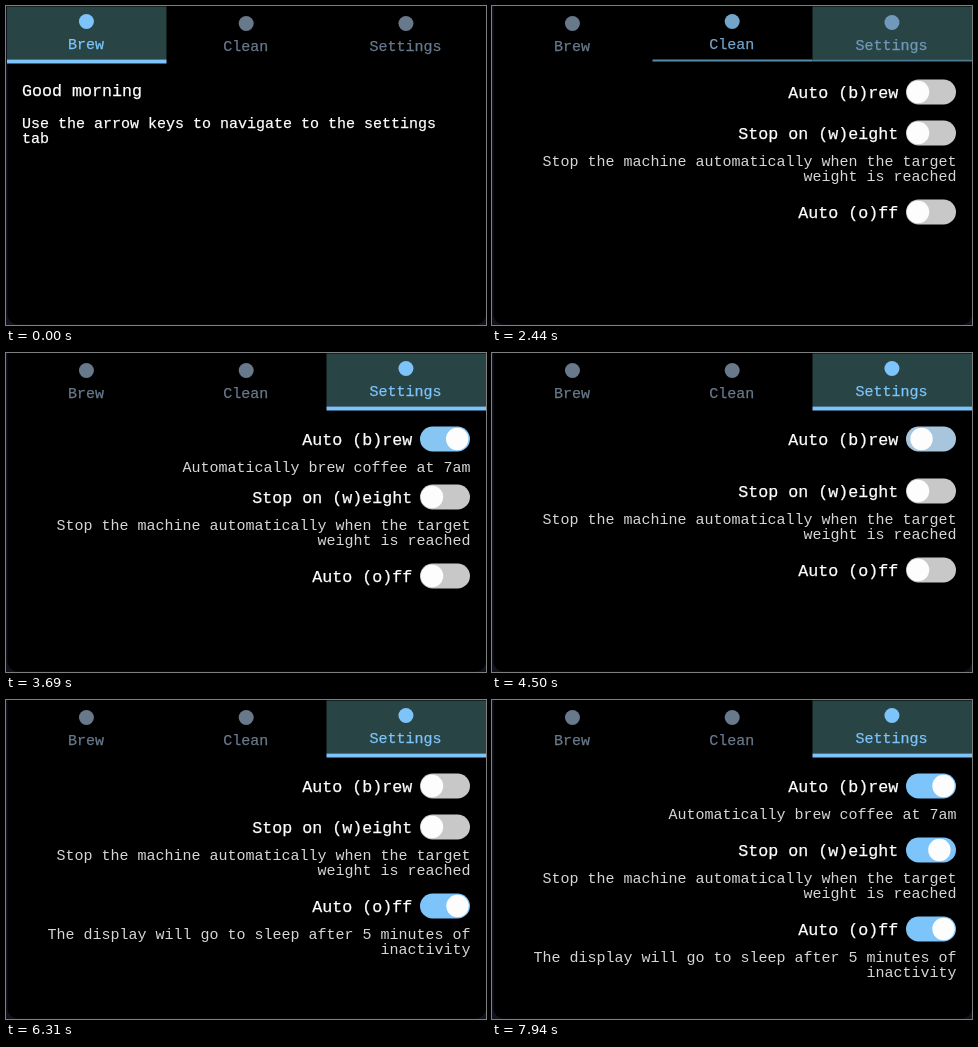
An HTML page with a canvas that plays this animation: 480x319 px, repeating every 8 s.

```html
<!DOCTYPE html>
<html lang="en">
<head>
<meta charset="utf-8">
<title>Coffee machine display</title>
<style>
  html, body { margin: 0; width: 100%; height: 100%; overflow: hidden; background: #10131d; }
  canvas { display: block; }
</style>
</head>
<body>
<canvas id="stage" width="480" height="319"></canvas>
<script>
const ctx = document.getElementById("stage").getContext("2d");
const LOOP = 8000;
const BLUE = [124, 196, 250], SLATE = [104, 121, 139], TEAL = [41, 68, 69], GREY = [200, 200, 200];
const SMALL = 15, LARGE = 16.67;

const tabs = [
  { name: "Brew", left: 1, right: 160.5, opens: -1000 },
  { name: "Clean", left: 160.5, right: 320.5, opens: 1190 },
  { name: "Settings", left: 320.5, right: 480, opens: 2402 }
];

const brew = {
  label: "Auto (b)rew", presses: [3563, 4416, 7200], tintMs: 150, noteHeight: 23,
  note: ["Automatically brew coffee at 7am"]
};
const weight = {
  label: "Stop on (w)eight", presses: [7860], tintMs: 80, alwaysOpen: true, noteHeight: 38,
  note: ["Stop the machine automatically when the target", "weight is reached"]
};
const off = {
  label: "Auto (o)ff", presses: [5750], tintMs: 150, noteHeight: 38,
  note: ["The display will go to sleep after 5 minutes of", "inactivity"]
};

const clamp = v => Math.min(1, Math.max(0, v));
const mix = (a, b, p) => `rgb(${a.map((v, i) => Math.round(v + (b[i] - v) * p))})`;

// The CSS "ease" curve: cubic-bezier(.25, .1, .25, 1).
function ease(x) {
  x = clamp(x);
  if (x === 0 || x === 1) return x;
  let low = 0, high = 1;
  for (let i = 0; i < 20; i++) {
    const s = (low + high) / 2;
    const at = 0.75 * s * (1 - s) + s ** 3;
    if (at < x) low = s; else high = s;
  }
  return 0.3 * low * (1 - low) ** 2 + 3 * low * low * (1 - low) + low ** 3;
}

function text(value, x, y, size, color, align = "left", outline = 0.25) {
  ctx.font = `${size}px "Liberation Mono", monospace`;
  ctx.textAlign = align;
  ctx.fillStyle = ctx.strokeStyle = color;
  ctx.fillText(value, x, y);
  if (outline) {
    ctx.lineWidth = outline;
    ctx.strokeText(value, x, y);
  }
}

function box(x, y, w, h, color, radius = 0) {
  ctx.fillStyle = color;
  ctx.beginPath();
  ctx.roundRect(x, y, w, h, radius);
  ctx.fill();
}

function disc(x, y, r, color) {
  ctx.fillStyle = color;
  ctx.beginPath();
  ctx.arc(x, y, r, 0, 2 * Math.PI);
  ctx.fill();
}

function drawTab(tab, index, active, t) {
  const changed = ease((t - tabs[active].opens) / 150);
  const p = index === active ? changed : index === active - 1 ? 1 - changed : 0;
  const lift = Math.ceil(2 * p);
  const width = tab.right - tab.left;
  const center = (tab.left + tab.right) / 2;
  const color = mix(SLATE, BLUE, p);
  if (index === active) box(tab.left, 0.5, width, 53, `rgb(${TEAL})`);
  if (p > 0) box(tab.left, 53.5, width, Math.round(4 * p), mix(TEAL, BLUE, p));
  disc(center - 0.3, 17.5 - lift, 7.5, color);
  text(tab.name, center - 0.8, 45 - lift, SMALL, color, "center");
}

function switchState(item, t) {
  const done = item.presses.filter(time => time <= t);
  const on = done.length % 2 === 1;
  const elapsed = done.length ? t - done[done.length - 1] : Infinity;
  const toward = p => on ? p : 1 - p;
  return {
    on,
    knob: toward(ease(elapsed / 150)),
    tint: toward(clamp(elapsed / item.tintMs)),
    open: item.alwaysOpen ? 1 : toward(ease(elapsed / 280))
  };
}

// Returns the height the note takes up below the switch.
function drawSetting(item, y, t) {
  const state = switchState(item, t);
  const height = Math.floor(item.noteHeight * state.open);
  text(item.label, 406.3, y + 6, LARGE, "#fff", "right");
  box(414, y - 12.5, 50, 25, mix(GREY, BLUE, state.tint), 12.5);
  disc(426 + 25.5 * state.knob, y, 11.2, "#fdfdfd");
  if (state.on || item.alwaysOpen) {
    ctx.save();
    ctx.beginPath();
    ctx.rect(0, y + 18, 480, height + 2);
    ctx.clip();
    item.note.forEach((line, i) => text(line, 464.5, y + 33 + 15 * i, SMALL, "#d6d6d6", "right", 0));
    ctx.restore();
  }
  return height;
}

const pages = [
  () => {
    text("Good morning", 16, 90, LARGE, "#fff");
    text("Use the arrow keys to navigate to the settings", 16, 122, SMALL, "#fff");
    text("tab", 16, 137, SMALL, "#fff");
  },
  () => text("Clean", 240.5, 90, LARGE, "#d0441c", "center"),
  t => {
    let y = 86;
    y += 41 + drawSetting(brew, y, t);
    y += 41 + drawSetting(weight, y, t);
    drawSetting(off, y, t);
  }
];

function draw(t) {
  box(0, 0, 480, 319, "#10131d");
  box(1.5, -20, 478.5, 338.5, "#000", 10);
  const active = tabs.filter(tab => tab.opens <= t).length - 1;
  tabs.forEach((tab, i) => drawTab(tab, i, active, t));
  pages[active](t);
}

const start = performance.now();
function tick() {
  draw((performance.now() - start) % LOOP);
  requestAnimationFrame(tick);
}
tick();
</script>
</body>
</html>
```
